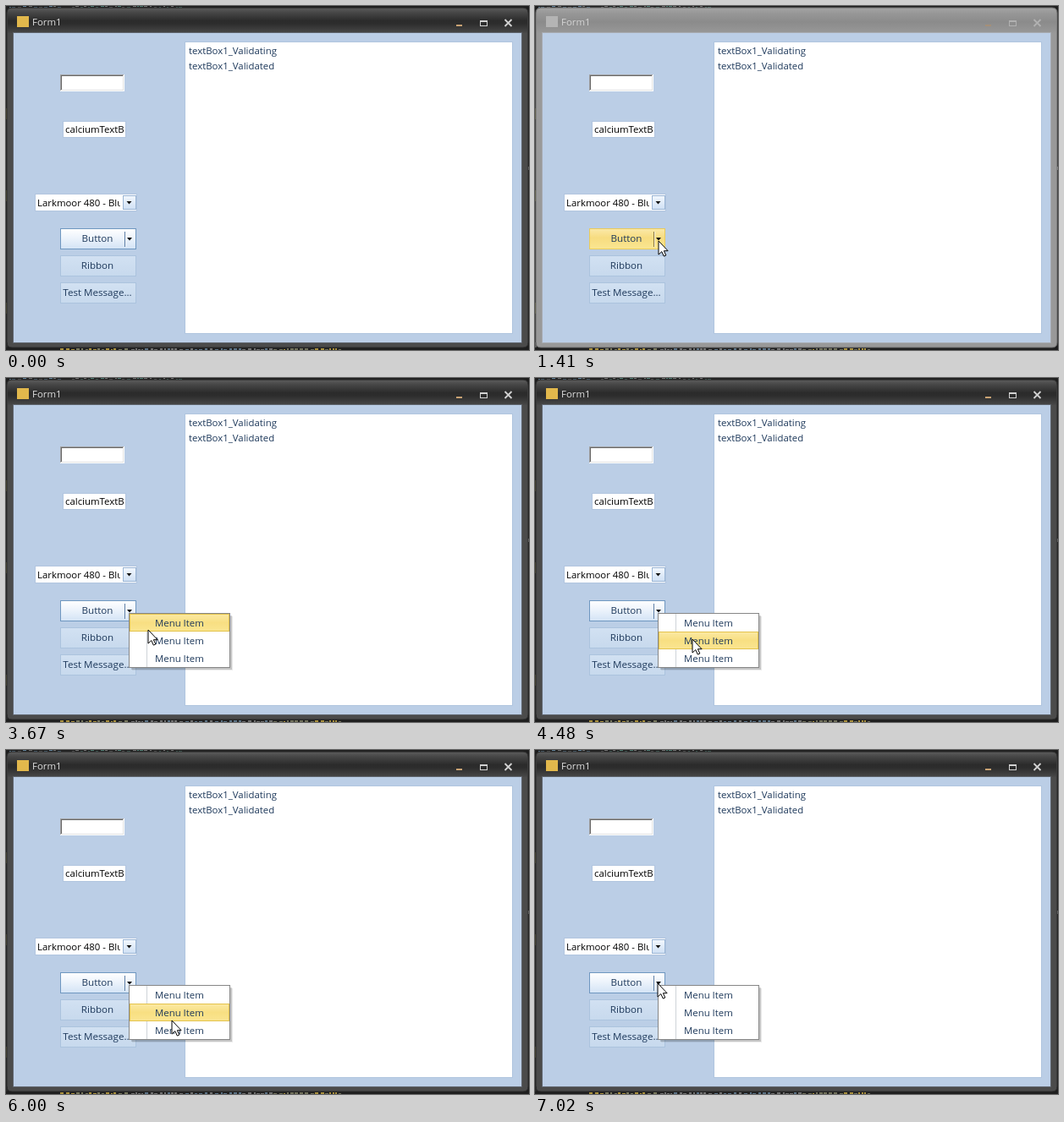
Animation of 618x407 px, one loop 8000 ms. Source, as an HTML page:

```html
<!DOCTYPE html>
<html lang="en">
<head>
<meta charset="utf-8">
<title>Form demo</title>
<style>
html, body { margin: 0; width: 100%; height: 100%; overflow: hidden; background: #1e1e1e; }
svg { display: block; width: 618px; height: 407px; }
text { font: 11.4px "Open Sans", "Noto Sans", sans-serif; fill: #1e395b; white-space: pre; }
.black { fill: #000; }
.label { font-size: 11.6px; text-anchor: middle; }
rect { shape-rendering: crispEdges; }
</style>
</head>
<body>
<svg id="stage" viewBox="0 0 618 407" xmlns="http://www.w3.org/2000/svg"></svg>
<script>
const LOOP = 8000;
const stage = document.getElementById('stage');

const rect = (x, y, w, h, fill, extra = '') =>
  `<rect x="${x}" y="${y}" width="${w}" height="${h}" fill="${fill}" ${extra}/>`;
const box = (x, y, w, h, fill, stroke, extra = '') =>
  rect(x + 0.5, y + 0.5, w - 1, h - 1, fill, `stroke="${stroke}" ${extra}`);
const text = (x, y, s, cls = '', extra = '') =>
  `<text x="${x}" y="${y}" class="${cls}" ${extra}>${s}</text>`;
const arrow = (x, y) => `<path d="M${x} ${y}h6l-3 3.4z" fill="#111"/>`;
const gradient = (id, ...stops) =>
  `<linearGradient id="${id}" x2="0" y2="1">` +
  stops.map(([at, c]) => `<stop offset="${at}" stop-color="${c}"/>`).join('') +
  '</linearGradient>';
const clip = (id, x, y, w, h) =>
  `<clipPath id="${id}"><rect x="${x}" y="${y}" width="${w}" height="${h}"/></clipPath>`;

// Slivers of an editor that peek out around the window
function editorEdges() {
  let seed = 7, out = '';
  const rand = () => (seed = (seed * 16807) % 2147483647) / 2147483647;
  const run = (x, end, y, h, colors) => {
    while (x < end) {
      const w = 2 + Math.floor(rand() * 3);
      out += rect(x, y + Math.floor(rand() * 2), w, h, colors[Math.floor(rand() * colors.length)]);
      x += w + 1 + Math.floor(rand() * 3);
    }
  };
  run(4, 66, 0, 1, ['#5f7f96', '#6b6b6b']);
  run(78, 208, 0, 1, ['#6e6e6e', '#4d7a70']);
  run(64, 146, 405, 2, ['#a88f3c', '#77775c']);
  run(148, 314, 405, 2, ['#707070', '#5a7184']);
  run(316, 398, 405, 2, ['#a88f3c', '#70705a']);
  for (const y of [121, 218, 351]) out += rect(0, y, 1, 13, '#55502e');
  return out + rect(617, 190, 1, 4, '#8a8a8a');
}

function frame(id, c) {
  return `<g id="${id}">` +
    `<path d="M1 404V8q0-6 6-6H611q6 0 6 6V398q0 6-6 6H7q-6 0-6-6z" fill="${c.side}" stroke="${c.edge}"/>` +
    `<path d="M2 32V8q0-5 5-5H611q5 0 5 5V32z" fill="url(#${id}Bar)"/>` +
    rect(8, 31, 602, 368, c.inner) +
    rect(13, 12, 14, 13, c.icon) +
    text(31, 23, 'Form1', '', `style="fill:${c.title}"`) +
    rect(532, 22, 7, 2, c.min) +
    box(560, 17, 9, 7, 'none', c.glyph) + rect(560, 17, 9, 2, c.glyph) +
    `<path d="M589.5 16l8 8m0-8l-8 8" stroke="${c.glyph}" stroke-width="1.8" fill="none"/></g>`;
}

function button(y, s) {
  return box(64, y, 90, 25, 'url(#plain)', '#abc3de') + text(109 - 1, y + 16, s, 'label');
}

function splitButton(id, fill, stroke, line) {
  return `<g id="${id}">` + box(64, 263, 90, 25, `url(#${fill})`, stroke) +
    rect(140, 267, 1, 18, line) + rect(141, 267, 1, 18, '#fff', 'opacity=".6"') + '</g>';
}

const rowY = i => 279 + 21 * i;

stage.innerHTML = '<defs>' +
  gradient('activeBar', [0, '#5a5a5a'], [0.15, '#484848'], [0.5, '#2b2b2b'], [0.62, '#2d2d2d'], [1, '#484848']) +
  gradient('idleBar', [0, '#a3a3a3'], [0.2, '#979797'], [0.55, '#8b8b8b'], [1, '#989898']) +
  gradient('plain', [0, '#d2e1f2'], [1, '#c7d9ed']) +
  gradient('ready', [0, '#ffffff'], [0.4, '#eff5fc'], [1, '#d3e3f5']) +
  gradient('warm', [0, '#fbe9a8'], [0.45, '#f7dc80'], [1, '#fae691']) +
  gradient('drop', [0, '#f3f8fe'], [1, '#cfe0f4']) +
  gradient('pick', [0, '#fbe9a2'], [0.5, '#f8df82'], [1, '#fae590']) +
  clip('comboClip', 35, 223, 100, 19) + clip('fieldClip', 68, 137, 71, 18) + '</defs>' +
  rect(0, 0, 618, 407, '#1e1e1e') + editorEdges() +
  frame('active', { side: '#4b4b4b', edge: '#2c2c2c', inner: '#5f656d', icon: '#e2b84c', title: '#e2e2e2', min: '#c9a273', glyph: '#d2d2d2' }) +
  frame('idle', { side: '#999999', edge: '#6f6f6f', inner: '#a7abb1', icon: '#b4b4b4', title: '#d6d6d6', min: '#a58f78', glyph: '#b1b1b1' }) +
  rect(9, 32, 600, 366, '#bbcee6') +
  // output list
  box(211, 42, 388, 346, '#fff', '#b0c5df') +
  text(216, 57, 'textBox1_Validating') + text(216, 75, 'textBox1_Validated') +
  // sunken text box
  rect(64, 81, 76, 20, '#fff') + rect(64, 81, 75, 1, '#a0a0a0') + rect(64, 81, 1, 19, '#a0a0a0') +
  rect(65, 82, 73, 1, '#696969') + rect(65, 82, 1, 17, '#696969') +
  rect(65, 99, 74, 1, '#e3e3e3') + rect(138, 82, 1, 18, '#e3e3e3') +
  // flat text box and combo box
  box(67, 136, 75, 20, '#fff', '#b1c5df') +
  text(70, 150, 'calciumTextBox1', 'black', 'clip-path="url(#fieldClip)"') +
  box(34, 222, 121, 21, '#fff', '#b1c5df') +
  text(37, 237, 'Larkmoor 480 - Blue', 'black', 'clip-path="url(#comboClip)"') +
  box(138, 224, 16, 17, 'url(#drop)', '#9ab5d5') + arrow(142.5, 231) +
  // buttons
  splitButton('readyButton', 'ready', '#6f97c0', '#5c7da5') +
  splitButton('warmButton', 'warm', '#e9cb5c', '#8d7840') +
  text(108, 279, 'Button', 'label') + arrow(143, 274) +
  button(295, 'Ribbon') + button(327, 'Test Message...') +
  // menu
  '<g id="menu">' + rect(149, 282, 119, 64, '#000', 'opacity=".08"') +
  rect(148, 281, 119, 64, '#000', 'opacity=".16"') +
  box(145, 278, 120, 65, '#fff', '#868686') + rect(166, 279, 1, 63, '#cfd3d8') +
  '<g id="pickRow">' + box(146, 0, 118, 21, 'url(#pick)', '#e3c34d') + '</g>' +
  [0, 1, 2].map(i => text(176, rowY(i) + 15, 'Menu Item')).join('') + '</g>' +
  '<circle id="click" cx="146" cy="278" r="11.5" fill="#f5e01e" opacity=".65"/>' +
  '<path id="cursor" d="M.5.5V16.6L4.3 13.1 6.8 18.6 9.3 17.5 6.9 12.2H11.6z" fill="#fff" stroke="#000" stroke-linejoin="round"/>';

const el = id => document.getElementById(id);
const parts = Object.fromEntries(
  ['active', 'idle', 'readyButton', 'warmButton', 'menu', 'pickRow', 'click', 'cursor'].map(id => [id, el(id)]));
const show = (id, on) => parts[id].setAttribute('visibility', on ? 'inherit' : 'hidden');

// Pointer moves: first step, last step, step count, end point
const moves = [
  [640, 1410, 12, 146, 278],
  [3530, 3670, 3, 168, 298],
  [4070, 4480, 6, 186, 309],
  [4550, 4830, 5, 195, 315],
  [4900, 5180, 5, 199, 322],
  [5250, 5600, 6, 200, 330],
  [6000, 6200, 4, 183, 291],
  [6270, 6340, 2, 173, 284],
  [6670, 6870, 4, 141, 277],
  [7020, 7020, 1, 145, 276]
];

function pointer(t) {
  let x = 346, y = 417;
  for (const [start, end, n, toX, toY] of moves) {
    if (t < start) break;
    const gap = (end - start) / (n - 1) || 1;
    const step = Math.min(n, 1 + Math.floor((t - start) / gap + 0.001));
    let p = step / n;
    if (start === 640) p = 1 - Math.pow(1 - p, 1.6);
    x += (toX - x) * p;
    y += (toY - y) * p;
  }
  return [Math.round(x), Math.round(y)];
}

function draw(t) {
  const [x, y] = pointer(t);
  const idle = t >= 180 && t < 2870;
  const open = t >= 2870;
  const warm = t < 3130 && x < 154 && y < 288;
  const row = x >= 146 && y >= 279 ? Math.floor((y - 279) / 21) : -1;

  show('active', !idle);
  show('idle', idle);
  show('warmButton', warm);
  show('readyButton', !warm);
  show('menu', open);
  show('pickRow', open && row >= 0 && row < 3);
  parts.pickRow.setAttribute('transform', `translate(0 ${rowY(row)})`);
  show('click', open && t < 3130);
  show('cursor', t >= 640);
  parts.cursor.setAttribute('transform', `translate(${x - 0.5} ${y - 0.5})`);
}

const begin = performance.now();
function tick() {
  draw((performance.now() - begin) % LOOP);
  requestAnimationFrame(tick);
}
tick();
</script>
</body>
</html>
```
